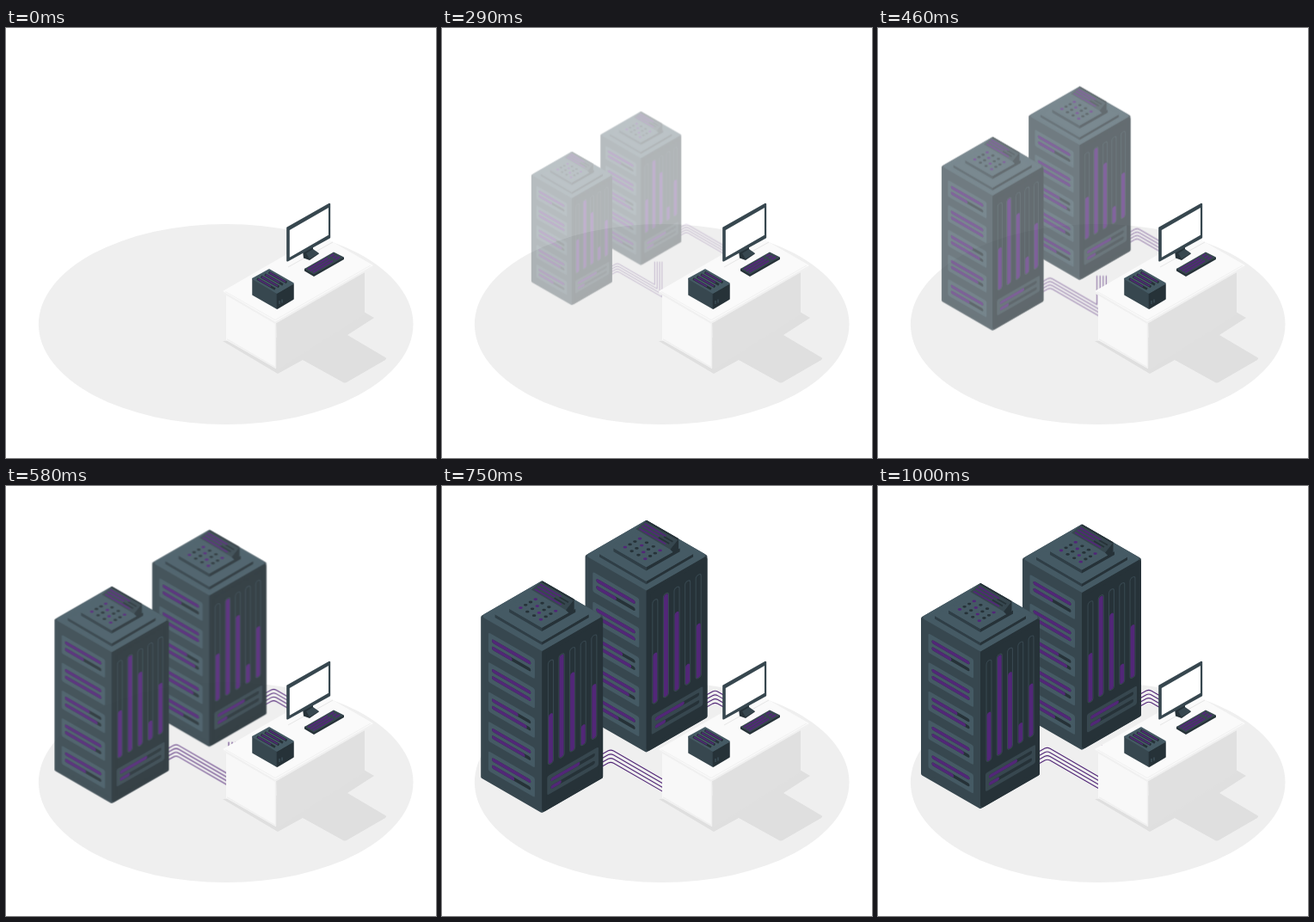
Recreate the animation shown at these times as an HTML page. Size 500x500 px, loop 1.04 s.

```html
<!DOCTYPE html>
<html lang="en">
<head>
<meta charset="utf-8">
<title>Server racks</title>
<style>
  html, body { margin: 0; height: 100%; overflow: hidden; background: #fff; }
  svg { display: block; width: 100vw; height: 100vh; }
</style>
</head>
<body>
<svg viewBox="0 0 500 500" stroke-linejoin="round">
  <ellipse cx="255.7" cy="344.5" rx="217.8" ry="116.5" fill="#efefef"/>
  <path fill="#dfdfdf" d="M252 364L316 402 345 386 392 412Q394 413 396 412L441 386Q443 384 441 383L397 357 428 337 416 330 314 360z"/>

  <g id="racks">
    <g id="cables" fill="none" stroke="#522778" stroke-width="1.1"></g>
    <use href="#rack" x="118" y="-68.5"/>
    <g id="rack">
      <g stroke-width="5">
        <path fill="#37474f" stroke="#37474f" d="M119 115.9L185.5 154.2V334.3L119 372.6 52.5 334.3V154.2z"/>
        <path fill="#263238" stroke="#263238" d="M121.5 193.9L185.5 157V334.3L121.5 371.2z"/>
        <path fill="#455a64" stroke="#455a64" d="M119 115.9L183 152.8 119 189.6 55 152.8z"/>
      </g>
      <path fill="#2f3e46" d="M66 151V154.5L119 185.5V182z"/>
      <path fill="#263238" d="M172 151V154.5L119 185.5V182z"/>
      <path fill="#455a64" d="M119 120L172 151 119 182 66 151z"/>
      <path fill="#2f3e46" d="M82 144.5V148.5L119 170V166z"/>
      <path fill="#263238" d="M157 144.5V148.5L119 170V166z"/>
      <path fill="#455a64" d="M119 122.5L157 144.5 119 166 82 144.5z"/>
      <g id="keys"></g>
      <path fill="#37474f" d="M107 123L119 113 155.5 134 146 146z"/>
      <path fill="#263238" d="M146 146L155.5 134V147L150 150z"/>
      <path stroke="#263238" stroke-width="1.8" d="M119 113.8L155 134.5M133 132.5L145 139.5M139 131.5L149 137.3"/>
      <path stroke="#522778" stroke-width="1.8" d="M111 122.5L141 140M114 119.5L134 131M117 117L141 131"/>
      <g id="left" transform="matrix(1 .577 0 1 50 153)"></g>
      <g id="right" transform="matrix(1 -.577 0 1 119 192.5)"></g>
    </g>
  </g>

  <!-- desk -->
  <path fill="#e0e0e0" d="M314 343L417 283V333L316 397z"/>
  <path fill="#f8f8f8" d="M256 308L314 342V396L256 363z"/>
  <path fill="none" stroke="#f0f0f0" stroke-width="1.5" d="M313.5 344V395L257 362"/>
  <path fill="#f0f0f0" d="M252 306V308.5L313 344 427 278.5V276z"/>
  <path fill="#fafafa" d="M252 306L365.5 240.5 427 276 313 341.5z"/>
  <path fill="none" stroke="#f1f1f1" d="M255 306.5L313 339.5 424 276"/>
  <path stroke="#e6e6e6" d="M328 278L380 249"/>

  <!-- monitor -->
  <path fill="#263238" d="M345 259L357 252V258L364 262.5 353 270 346 267.5z"/>
  <path fill="#37474f" d="M349 262L357 257 364 262 353 268.5z"/>
  <path fill="#37474f" stroke="#37474f" stroke-width="2" d="M327.2 232.3L376.2 204.7V243.5L327.2 270.5z"/>
  <path fill="#fff" d="M329.8 235L375 209V240.8L329.8 266.8z"/>

  <!-- keyboard -->
  <path fill="#263238" d="M347 280V282.5L358 289 393 269V266.5z"/>
  <path fill="#37474f" d="M347 280L381 260.5 393 266.5 358 286.5z"/>
  <path stroke="#522778" stroke-width="2" d="M351 280.5L374 267.3M354 282.3L377 269M357 284L380 270.7M377 265.5L381 263.2M380 267.3L384 265M383 269L388 266.2"/>

  <!-- small case -->
  <g stroke-width="1.5">
    <path fill="#37474f" stroke="#37474f" d="M287 291.5L315 308V326L287 310z"/>
    <path fill="#263238" stroke="#263238" d="M315.5 309L334 298V315L315.5 326z"/>
    <path fill="#455a64" stroke="#455a64" d="M287 291.5L306 281 334 297 315 308z"/>
    <path stroke="#263238" stroke-width="2.6" d="M292 291.5L313 303.6M296.5 289L317.5 301M301 286.5L322 298.5M305.5 284L326.5 296"/>
    <path stroke="#522778" d="M293 292L308 300.6M297.5 289.5L316 300.2M302 287L318 296.2M306.5 284.5L325 295.2"/>
    <path stroke="#455a64" stroke-width="1" d="M318 317V321M321 315.5V319.5"/>
  </g>
</svg>

<script>
const PURPLE = '#522778', DARK = '#263238', MID = '#37474f', LIGHT = '#455a64';
const $ = id => document.getElementById(id);

function add(parent, tag, attrs) {
  const el = document.createElementNS('http://www.w3.org/2000/svg', tag);
  for (const key in attrs) el.setAttribute(key, attrs[key]);
  $(parent).append(el);
}
const bar = (parent, x, y, width, height, fill, rx = 2) =>
  add(parent, 'rect', { x, y, width, height, fill, rx });

// Drive bays: filled share of the upper and lower bar
[[1, .52], [1, 1], [.68, .9], [1, .85], [1, .58]].forEach((fills, i) => {
  const y = 13.3 + 33.5 * i;
  bar('left', 8.5, y, 52.5, 22.5, LIGHT);
  fills.forEach((fill, j) => {
    bar('left', 12.5, y + 5.2 + 8 * j, 44, 4, DARK);
    bar('left', 12.5, y + 5.2 + 8 * j, 44 * fill, 4, PURPLE);
  });
});

// Vertical slots: top of each purple level
[76.3, 17, 44, 110, 71.5].forEach((top, i) => {
  const x = 10 + 12.25 * i;
  bar('right', x - 3.5, 15.5, 7, 118, MID, 3.5);
  bar('right', x - 2.4, 16.6, 4.8, 115.8, DARK, 2.4);
  bar('right', x - 2.4, top, 4.8, 132.4 - top, PURPLE, 2.4);
});
bar('right', 6, 145, 58, 21.5, MID);
[33, 12].forEach((width, i) => {
  bar('right', 10, 149.5 + 8.5 * i, 50, 4, DARK);
  bar('right', 10, 149.5 + 8.5 * i, width, 4, PURPLE);
});

for (let i = 0; i < 16; i++) {
  const a = i % 4, b = i >> 2;
  add('keys', 'ellipse', {
    cx: 95 + 7.6 * a + 5.6 * b, cy: 143.5 + 4.4 * a - 3.2 * b,
    rx: 2.2, ry: 1.4, fill: (a + b) % 3 ? DARK : PURPLE
  });
}

for (let k = 0; k < 4; k++) {
  const y = .6 + 4.6 * k;
  const cable = (x, tail) => `M186 ${309 + y}L194 ${304.5 + y}Q197 ${303 + y} 200 ${304.7 + y}` +
    `L${x} ${304.7 + y + .577 * (x - 200)}${tail}`;
  add('cables', 'path', { d: cable(260.5 + 4.2 * k, 'V301') });
  add('cables', 'path', { d: cable(267, ''), transform: 'translate(118 -67)' });
}

const bezier = (s, p, q) => 3 * (1 - s) ** 2 * s * p + 3 * (1 - s) * s * s * q + s ** 3;

// Overshooting cubic-bezier(.36, -.01, .5, 1.38)
function ease(x) {
  if (x >= 1) return 1;
  let lo = 0, hi = 1;
  for (let i = 0; i < 24; i++) {
    const mid = (lo + hi) / 2;
    if (bezier(mid, .36, .5) < x) lo = mid; else hi = mid;
  }
  return bezier(lo, -.01, 1.38);
}

const LOOP = 1040, FPS = 24, LEAD = 12;

function draw() {
  const step = Math.floor((performance.now() % LOOP + LEAD) * FPS / 1000);
  const p = step < 3 ? 0 : ease((step + .65) / FPS);
  $('racks').setAttribute('opacity', Math.min(1, p));
  $('racks').setAttribute('transform',
    `translate(218.7 209) scale(${.5 + p / 2}) translate(-218.7 -209)`);
  requestAnimationFrame(draw);
}
draw();
</script>
</body>
</html>
```
